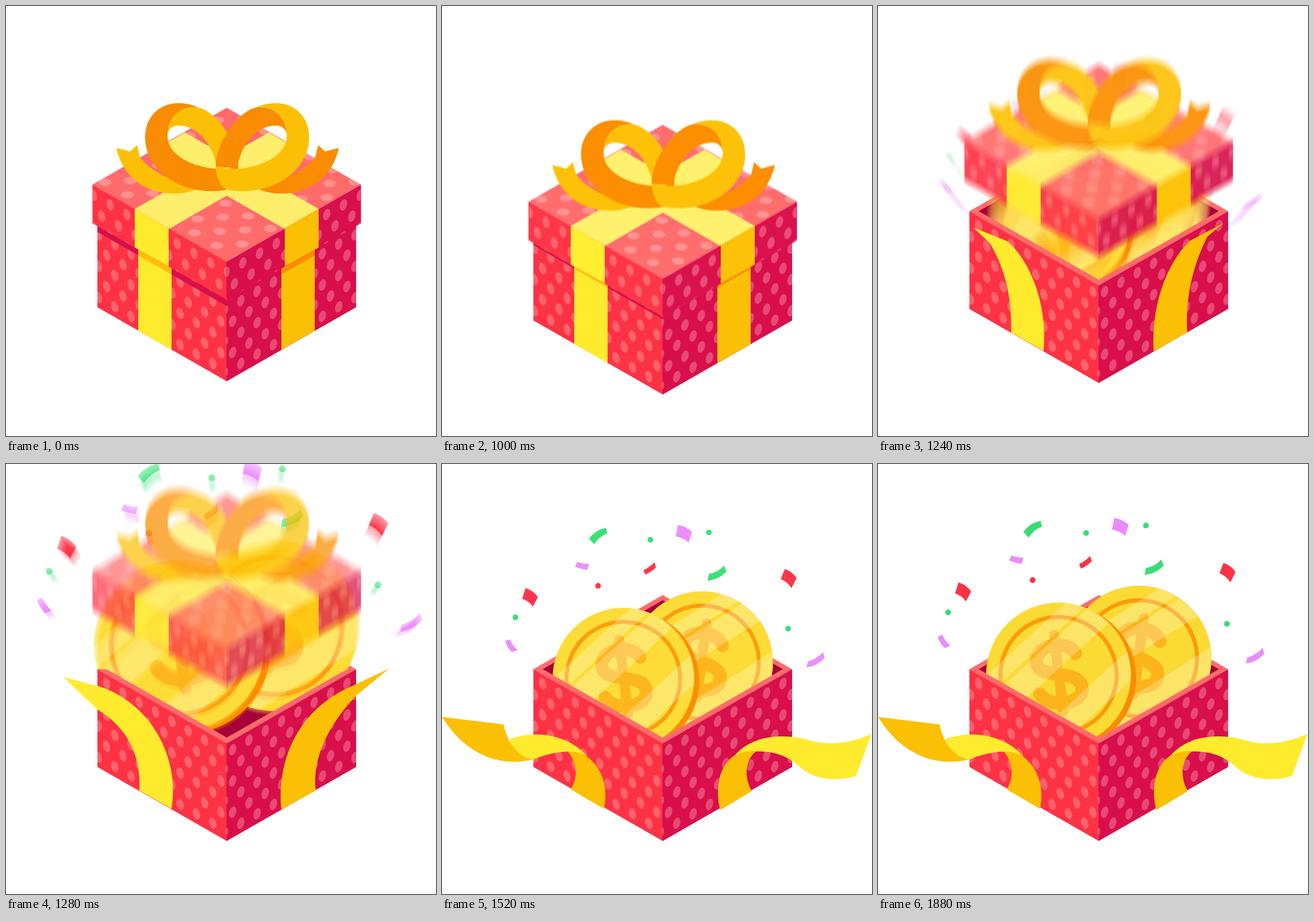
Animation of 748x748 px, one loop 2.88 s. Source, as an HTML page with a canvas:

```html
<!DOCTYPE html>
<html lang="en">
<head>
<meta charset="utf-8">
<title>Gift box</title>
<style>
html, body { margin: 0; width: 100%; height: 100%; overflow: hidden; background: #fff; }
canvas { display: block; width: 748px; height: 748px; }
</style>
</head>
<body>
<script>
const SIZE = 748, LOOP = 2880, STEP = 40;
const GOLD = '#fbc004', ORANGE = '#f98c00', YELLOW = '#ffeb2e', PALE = '#ffee6b';
const RED = '#fd3245', CRIMSON = '#d80f4b', PINK = '#ff6b6b';
const GREEN = '#37de74', VIOLET = '#e98bfd', COIN = '#fbda34';

function layer() {
  const c = document.createElement('canvas');
  c.width = c.height = SIZE;
  return c.getContext('2d');
}
const stage = layer(), scratch = layer(), sum = layer();
document.body.append(stage.canvas);
let g = stage;

// ---------- drawing helpers ----------
function shape(d, color) {
  g.fillStyle = color;
  g.fill(new Path2D(d));
}
function mirrored(draw, axis = 384) {
  g.save();
  g.translate(2 * axis, 0);
  g.scale(-1, 1);
  draw();
  g.restore();
}
function dotted(d, color, dotColor, lat) {
  const [x, y, ax, ay, bx, by, rx, ry, rot] = lat;
  shape(d, color);
  g.save();
  g.clip(new Path2D(d));
  g.fillStyle = dotColor;
  g.beginPath();
  for (let i = -10; i < 19; i++) for (let j = -14; j < 15; j++) {
    const px = x + i * ax + j * bx, py = y + i * ay + j * by;
    if (px < 130 || px > 640 || py < 160 || py > 670) continue;
    g.moveTo(px, py);
    g.ellipse(px, py, rx, ry, rot, 0, 7);
  }
  g.fill();
  g.restore();
}
// Keeps a running average of several poses as one motion-blurred picture.
function blurred(draw, poses, alpha = 1) {
  sum.globalAlpha = 1;
  sum.clearRect(0, 0, SIZE, SIZE);
  poses.forEach((p, k) => {
    g = scratch;
    g.clearRect(0, 0, SIZE, SIZE);
    g.save();
    draw(p);
    g.restore();
    sum.globalAlpha = 1 / (k + 1);
    sum.globalCompositeOperation = 'destination-out';
    sum.fillRect(0, 0, SIZE, SIZE);
    sum.globalCompositeOperation = 'lighter';
    sum.drawImage(scratch.canvas, 0, 0);
  });
  g = stage;
  g.globalAlpha = alpha;
  g.drawImage(sum.canvas, 0, 0);
  g.globalAlpha = 1;
}

// ---------- timing ----------
function track(t, start, list) {
  const u = Math.max(0, Math.min(list.length - 1, (t - start) / STEP));
  const i = Math.min(list.length - 2, Math.floor(u));
  return list[i] + (list[i + 1] - list[i]) * (u - i);
}
const ease = p => (1 - Math.cos(Math.PI * Math.max(0, Math.min(1, p)))) / 2;
const bodyY = t => track(t, 840, [-3, -1, 5, 13, 20, 21, 17, 8, 0]);
const lidY = t => track(t, 840, [0, 2, 8, 18, 30, 36, 36, 25, 4, -30, -75, -124, -178]);
const lidAlpha = t => track(t, 1200, [1, .92, .72, .35, 0]);
function burst(t) {
  if (t < 1280) return track(t, 1160, [.02, .45, .96, 1.18]);
  if (t < 1520) return 1.18 - .202 * ease((t - 1280) / 240);
  return .978 + .022 * ease((t - 1520) / 360);
}
const around = (t, f) => Array.from({ length: 12 }, (_, i) => f(t + (i - 5.5) * 1.3));

// ---------- box ----------
const BODY_DOTS = [175, 382, 14.2, 35.45, 0, 54.5, 6, 10.3, -.28];
const LID_DOTS = [181, 346, 14.6, 36.4, 0, 56, 6, 10.3, -.28];
const TOP_DOTS = [382, 343, 39, 22, -5, 24.5, 11, 6.3, .04];
const SIDE = 'M159 357L384.5 486V656L159 527Z';

function sides() {
  dotted(SIDE, RED, '#ff626b', BODY_DOTS);
  mirrored(() => dotted(SIDE, CRIMSON, '#e84a73', BODY_DOTS));
}
function closedBody(y) {
  g.save();
  g.translate(0, y);
  sides();
  const seam = 'M159 365L384 494V525L159 396Z';
  const band = 'M230 390L288 423V601L230 568Z';
  const bandSeam = 'M230 406L288 439V470L230 437Z';
  shape(seam, CRIMSON);
  shape(band, YELLOW);
  shape(bandSeam, '#ffbe08');
  mirrored(() => {
    shape(band, GOLD);
    shape(bandSeam, ORANGE);
  }, 383.5);
  g.restore();
}
function lid(y) {
  g.translate(0, y);
  const side = 'M150.5 311L384.5 445V511L150.5 378Z';
  const strip = 'M224 353L283 387V453L224 420Z';
  const cross = 'M224 353L283 388L516 254L457 220Z';
  dotted('M384 177L618 311L384 445L150 311Z', PINK, '#ff9090', TOP_DOTS);
  shape(cross, PALE);
  mirrored(() => shape(cross, PALE));
  dotted(side, RED, '#ff626b', LID_DOTS);
  shape(strip, YELLOW);
  mirrored(() => {
    dotted(side, CRIMSON, '#e84a73', LID_DOTS);
    shape(strip, GOLD);
  });
  bow();
}
function bow() {
  const tail = 'M192 247L216 253L228 242L233 263C252 289 292 306 335 317C300 336 211 332 192 247Z';
  const limb = 'M333 176C369 184 404 240 404.5 279L366 283C366 255 340 208 300 208C289 208 281 215 281 226C281 200 296 174 333 176Z';
  const loop = 'M333 176C322 171 312 169 300 169C265 169 242 195 242 228C242 285 300 322 355 322C375 322 386 320 391 316C399 308 404 295 404.5 279C394 283 379 284 366 283C330 281 281 262 281 226C281 200 296 174 333 176Z';
  shape(tail, GOLD);
  mirrored(() => shape(tail, ORANGE), 385.5);
  shape(limb, GOLD);
  shape(loop, ORANGE);
  mirrored(() => {
    shape(limb, ORANGE);
    shape(loop, GOLD);
  }, 384.7);
}

// ---------- coins and confetti ----------
function disc(x, y, r, color) {
  g.fillStyle = color;
  g.beginPath();
  g.arc(x, y, r, 0, 7);
  g.fill();
}
const SHINES = [[-84, -57], [-51, -8], [50, 92]];

function coin(x, y, tilt, shineAngle, depth) {
  g.save();
  g.translate(x, y);
  disc(depth, depth / 2, 126, ORANGE);
  disc(0, 0, 126, COIN);
  g.lineWidth = 7;
  g.strokeStyle = '#fb9b0a';
  g.beginPath();
  g.arc(0, 0, 101, 0, 7);
  g.stroke();

  g.save();
  g.translate(0, -7);
  g.rotate(tilt);
  g.lineCap = 'round';
  g.strokeStyle = '#fcb41a';
  g.lineWidth = 23;
  g.stroke(new Path2D('M33 -27C22 -53 -34 -52 -36 -20C-38 14 38 -2 37 34C36 64 -25 63 -37 36'));
  g.lineWidth = 18;
  g.stroke(new Path2D('M0 -63V-12M0 20V70'));
  g.restore();

  g.beginPath();
  g.arc(0, 0, 126, 0, 7);
  g.clip();
  g.rotate(shineAngle);
  g.fillStyle = 'rgba(255,255,255,.25)';
  for (const [from, to] of SHINES) g.fillRect(-130, from, 260, to - from);
  g.restore();
}
const DOTS = [
  [362, 120, GREEN], [466, 107, GREEN], [122, 258, GREEN], [607, 278, GREEN], [269, 202, RED]
];
// Each scrap has curved long edges and straight ends.
const SCRAPS = [
  ['M253 118Q265 102 283 99L285 109Q271 114 262 128Z', GREEN],
  ['M411 94Q426 96 436 106L430 125Q420 116 407 114Z', VIOLET],
  ['M232 159Q242 163 253 163L250 174Q238 172 228 168Z', VIOLET],
  ['M350 174Q361 169 369 160L372 169Q363 178 353 182Z', RED],
  ['M466 181Q483 178 493 166L497 177Q483 191 464 193Z', GREEN],
  ['M140 206Q154 210 162 222L153 239Q146 229 134 225Z', RED],
  ['M601 172Q615 177 622 188L613 206Q606 195 594 190Z', RED],
  ['M104 300L112 297Q117 309 126 316L116 320Q107 312 104 300Z', VIOLET],
  ['M642 337Q658 332 669 320L672 330Q658 345 640 347Z', VIOLET]
];
function treasure(s) {
  g.translate(384, 656);
  g.scale(s, s);
  g.translate(-384, -656);
  coin(454, 338, .13, -.56, 0);
  coin(314, 367, -.12, -.74, 9);
  for (const [d, color] of SCRAPS) shape(d, color);
  for (const [x, y, color] of DOTS) disc(x, y, 5, color);
}

// ---------- untied ribbons ----------
const BAND = [231, 399, 288, 432, 288, 480, 288, 550, 288, 600, 231, 568, 231, 500, 231, 450, 231, 399];
const PEEL = [100, 371, 163, 387, 252, 417, 303, 510, 288, 600, 232, 568, 236, 500, 205, 455, 159, 427];
const PEEL_RIGHT = [102, 356, 163, 385, 249, 420, 298, 502, 289, 601, 229, 568, 236, 520, 213, 460, 159, 403];

function peel(end, k, color) {
  const p = BAND.map((v, i) => v + (end[i] - v) * k);
  shape(`M${p.slice(0, 2)}L${p.slice(2, 4)}C${p.slice(4, 10)}L${p.slice(10, 12)}C${p.slice(12)}Z`, color);
}
function leaning(x, lift, draw) {
  const sx = lift ? .9 : 1;
  g.save();
  g.transform(sx, lift, 0, 1, x - sx * x, -lift * x);
  draw();
  g.restore();
}
function ribbons(t) {
  if (t < 1320) {
    const k = track(t, 1200, [.1, .5, 1]);
    peel(PEEL, k, YELLOW);
    mirrored(() => peel(PEEL_RIGHT, k, GOLD));
    return;
  }
  const lift = t < 1360 ? .35 : 0;
  leaning(258, lift, () => {
    shape('M282 600L224 566C236 548 237 521 218 499C230 497 242 500 250 507C281 530 289 565 282 600Z', GOLD);
    shape('M117 479C160 462 220 470 253 509C237 496 197 497 157 515C140 513 125 499 117 479Z', YELLOW);
    shape('M0 440L107 453C112 475 125 508 158 514C110 526 46 514 0 440Z', GOLD);
  });
  leaning(510, -lift, () => {
    shape('M484 602C474 560 483 522 512 505C522 500 535 499 546 500C527 515 525 545 539 569Z', GOLD);
    shape('M508 509C535 474 590 466 640 481C680 492 715 483 747 470L720 543C680 554 643 548 618 523C592 502 570 500 545 500C530 499 518 502 508 509Z', YELLOW);
  });
}
function openBox(t) {
  shape('M159 357L384 228L609 357L384 486Z', PINK);
  shape('M175 357L384 237L593 357L384 476Z', '#a50037');
  blurred(treasure, t < 1880 ? around(t, burst) : [1]);
  sides();
  shape('M159 357L175 357L384 476L593 357L609 357L384 486Z', PINK);
  ribbons(t);
}

// ---------- loop ----------
function render(t) {
  g = stage;
  g.fillStyle = '#fff';
  g.fillRect(0, 0, SIZE, SIZE);
  if (t < 1200) closedBody(bodyY(t));
  else openBox(t);
  if (t < 1360) blurred(lid, t > 840 ? around(t, lidY) : [0], lidAlpha(t));
}
let shown = -1;
const begin = performance.now();
function tick() {
  const t = Math.floor((performance.now() - begin) % LOOP / STEP) * STEP;
  if (t !== shown) render(shown = t);
  requestAnimationFrame(tick);
}
tick();
</script>
</body>
</html>
```
